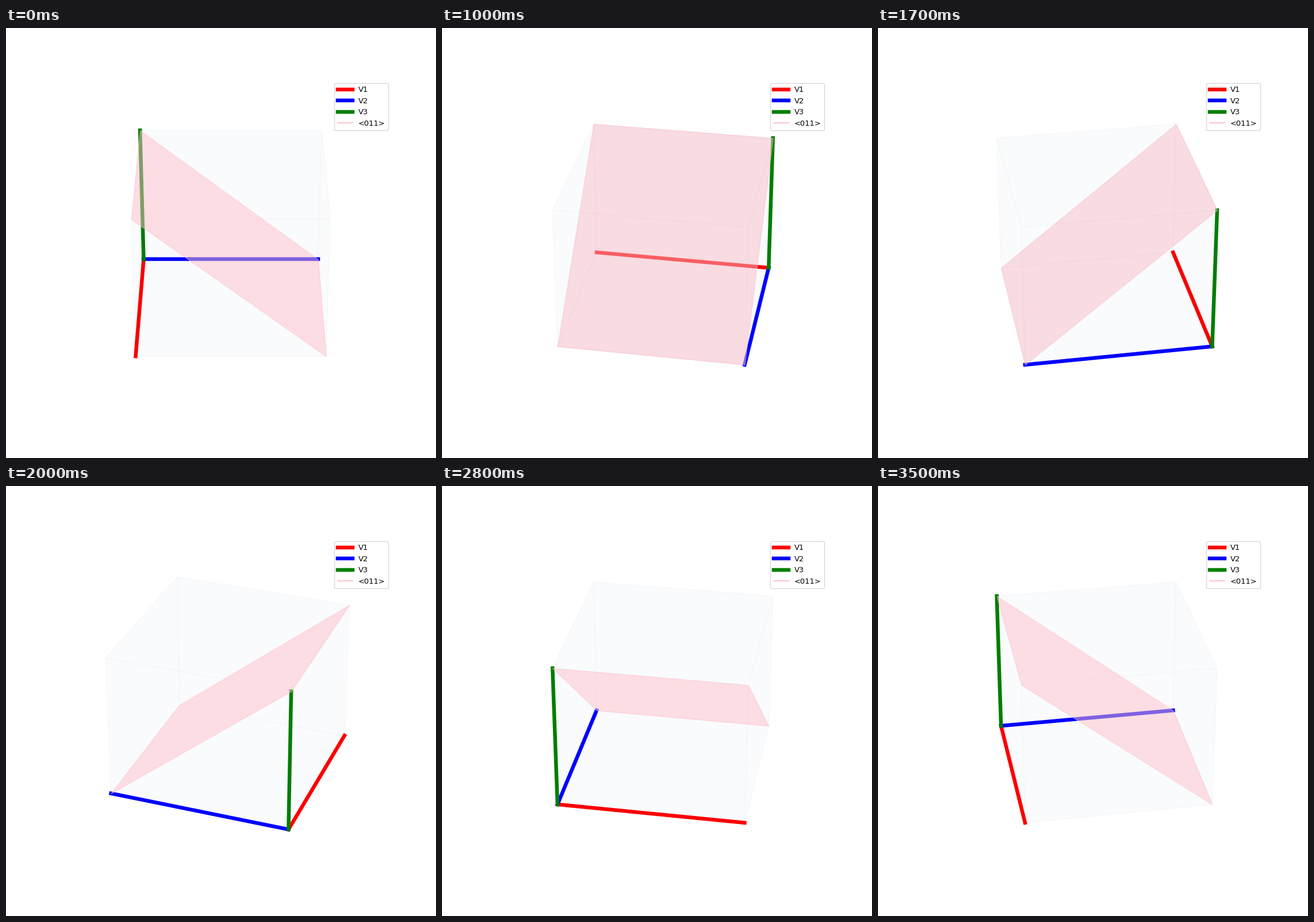
A matplotlib script for the animation above (3.6 s loop, 748x748 px).

```python
import math

import matplotlib.pyplot as plt
from matplotlib.animation import FuncAnimation
from matplotlib.colors import to_rgba
from mpl_toolkits.mplot3d.art3d import Poly3DCollection

FRAMES = 36
STEP = 360 / FRAMES

plt.rcParams["font.family"] = "DejaVu Sans"
fig = plt.figure(figsize=(8, 8), dpi=93.5, facecolor="white")
ax = fig.add_subplot(projection="3d", computed_zorder=False)
ax.set_axis_off()


def cube_faces():
    """Six unit-square faces, two per axis."""
    ring = [(0, 0), (1, 0), (1, 1), (0, 1)]
    faces = []
    for side in (0, 1):
        faces.append([(side, u, v) for u, v in ring])
        faces.append([(u, side, v) for u, v in ring])
        faces.append([(u, v, side) for u, v in ring])
    return faces


def add_faces(faces, fill, edge, alpha, zorder):
    """Add polygons whose fill and outline are equally see-through."""
    poly = Poly3DCollection(faces, facecolors=[to_rgba(fill, alpha)],
                            edgecolors=[to_rgba(edge, alpha)],
                            linewidths=1, zorder=zorder)
    ax.add_collection3d(poly)
    return poly


axes_ends = [
    ("V1", "red", (1, 0, 0)),
    ("V2", "blue", (0, 1, 0)),
    ("V3", "green", (0, 0, 1)),
]
for label, color, (x, y, z) in axes_ends:
    ax.plot([0, x], [0, y], [0, z], color=color, lw=5, label=label)
ax.plot([], [], [], color="pink", lw=1.5, label="<011>")

add_faces(cube_faces(), "tab:blue", "black", 0.01, 3)
plane = add_faces([[(0, 0, 1), (1, 0, 1), (1, 1, 0), (0, 1, 0)]],
                  "pink", "pink", 0.5, 4)

ax.set_xlim(-0.05, 1.05)
ax.set_ylim(-0.05, 1.05)
ax.set_zlim(0, 1)
ax.set_box_aspect((4, 4, 3), zoom=24 / 25)
ax.legend(loc="upper right")


def update(i):
    azim = i * STEP
    ax.view_init(elev=30, azim=azim)
    # The plane is in front only while it holds the cube's nearest corner.
    in_front = math.sin(math.radians(azim)) < 1e-9
    plane.set_zorder(4 if in_front else 2.5)
    return []


anim = FuncAnimation(fig, update, frames=FRAMES, init_func=lambda: update(0),
                     interval=100, repeat=True, repeat_delay=0, blit=False)
plt.show()
```
